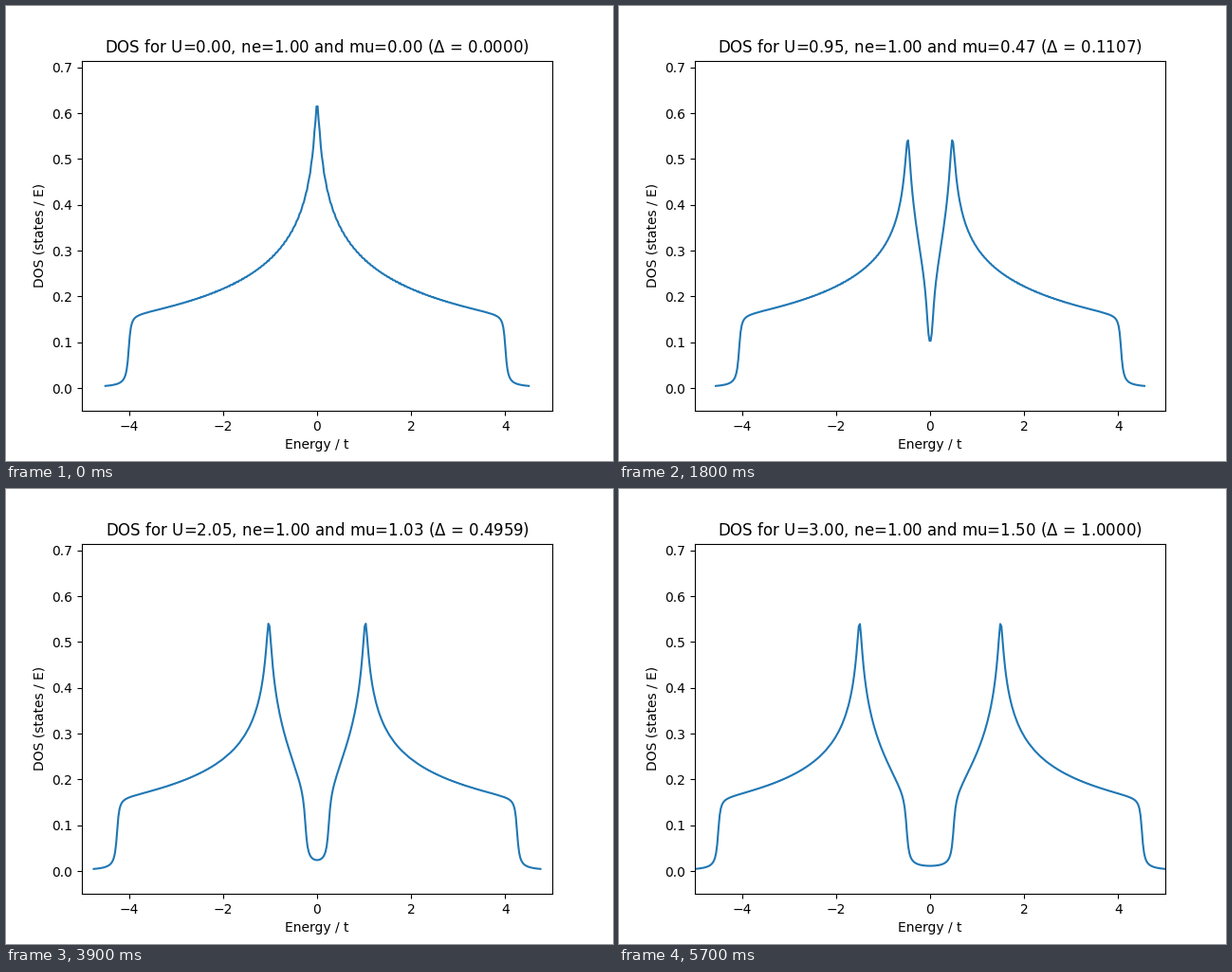
These frames come from a looping animation (640 px wide and 480 px high, 6000 ms). A matplotlib script:

```python
import numpy as np
import matplotlib.pyplot as plt
from matplotlib.animation import FuncAnimation

FRAMES = 20
ETA = 0.04          # Lorentzian broadening
NK = 100            # k points per direction in the quarter zone
NE = 400            # energy points
MARGIN = 0.5

k = np.linspace(0, np.pi, NK)
band = (-2 * (np.cos(k)[:, None] + np.cos(k)[None, :])).ravel()


def dos(energy, u):
    """Hubbard-I density of states at half filling, both spins."""
    w = energy + 1j * ETA
    z = w - u**2 / (4 * w)
    x, y = z.real, z.imag
    return np.array([2 / np.pi * np.mean(b / ((a - band)**2 + b**2))
                     for a, b in zip(x, y)])


def curve(u):
    edge = (4 + np.hypot(4, u)) / 2 + MARGIN
    energy = np.linspace(-edge, edge, NE)
    return energy, dos(energy, u)


us = np.linspace(0, 3, FRAMES)
curves = [curve(u) for u in us]

fig, ax = plt.subplots(figsize=(6.4, 4.8), dpi=100)
line, = ax.plot([], [])
ax.set_xlim(-5, 5)
ax.set_ylim(-0.05, 0.715)
ax.set_xlabel("Energy / t")
ax.set_ylabel("DOS (states / E)")


def update(i):
    u = us[i]
    gap = np.hypot(4, u) - 4
    line.set_data(*curves[i])
    title = ax.set_title(f"DOS for U={u:.2f}, ne=1.00 and mu={u / 2:.2f} "
                         rf"($\Delta$ = {gap:.4f})")
    return line, title


anim = FuncAnimation(fig, update, frames=FRAMES, interval=300,
                     init_func=lambda: update(0), repeat=True, repeat_delay=0)
plt.show()
```
